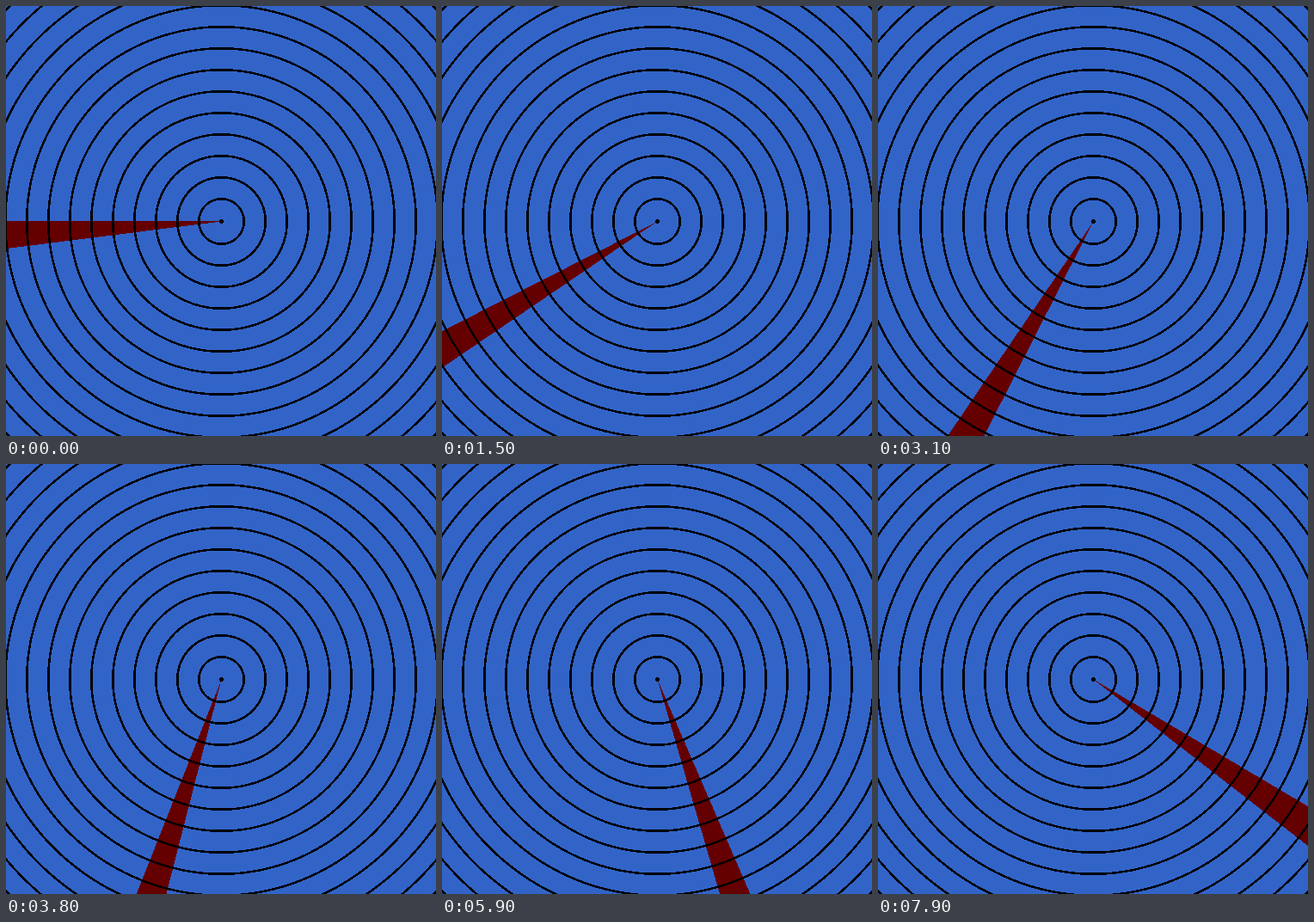
Animation, 500 px wide and 500 px high, one loop 8000 ms. Source, as an HTML page with a canvas:

```html
<!DOCTYPE html>
<html lang="en">
<head>
<meta charset="utf-8">
<title>Radar sweep</title>
<style>
  html, body { margin: 0; width: 100%; height: 100%; overflow: hidden; background: #3264c8; }
  canvas { display: block; width: 500px; height: 500px; }
</style>
</head>
<body>
<canvas id="stage" width="500" height="500"></canvas>
<script>
  const SIZE = 500, CENTER = 250;
  const GAP = 25, LINE = 2.5;     // ring spacing and thickness
  const STEP_MS = 100, STEPS = 80;
  const TURN = 1.8, SPREAD = 7.2; // degrees

  const ctx = document.getElementById('stage').getContext('2d');
  const image = ctx.createImageData(SIZE, SIZE);
  const pixels = new Uint32Array(image.data.buffer);

  // Colours are packed as ABGR.
  const BLUE = 0xffc86432, RED = 0xff000064, BLACK = 0xff000000;

  // Angles start at the left and turn counterclockwise.
  const angles = new Float64Array(SIZE * SIZE);
  const onRing = new Uint8Array(SIZE * SIZE);
  for (let y = 0, i = 0; y < SIZE; y++) {
    for (let x = 0; x < SIZE; x++, i++) {
      const dx = CENTER - x, dy = y - CENTER;
      angles[i] = Math.atan2(dy, dx) * 180 / Math.PI;
      onRing[i] = Math.hypot(dx, dy) % GAP < LINE;
    }
  }

  function draw(step) {
    const from = step * TURN, to = from + SPREAD;
    for (let i = 0; i < pixels.length; i++) {
      const inWedge = angles[i] >= from && angles[i] < to;
      pixels[i] = onRing[i] ? BLACK : inWedge ? RED : BLUE;
    }
    ctx.putImageData(image, 0, 0);
  }

  const start = performance.now();
  let shown = -1;
  function tick() {
    const step = Math.floor((performance.now() - start) / STEP_MS) % STEPS;
    if (step !== shown) draw(shown = step);
    requestAnimationFrame(tick);
  }
  tick();
</script>
</body>
</html>
```
